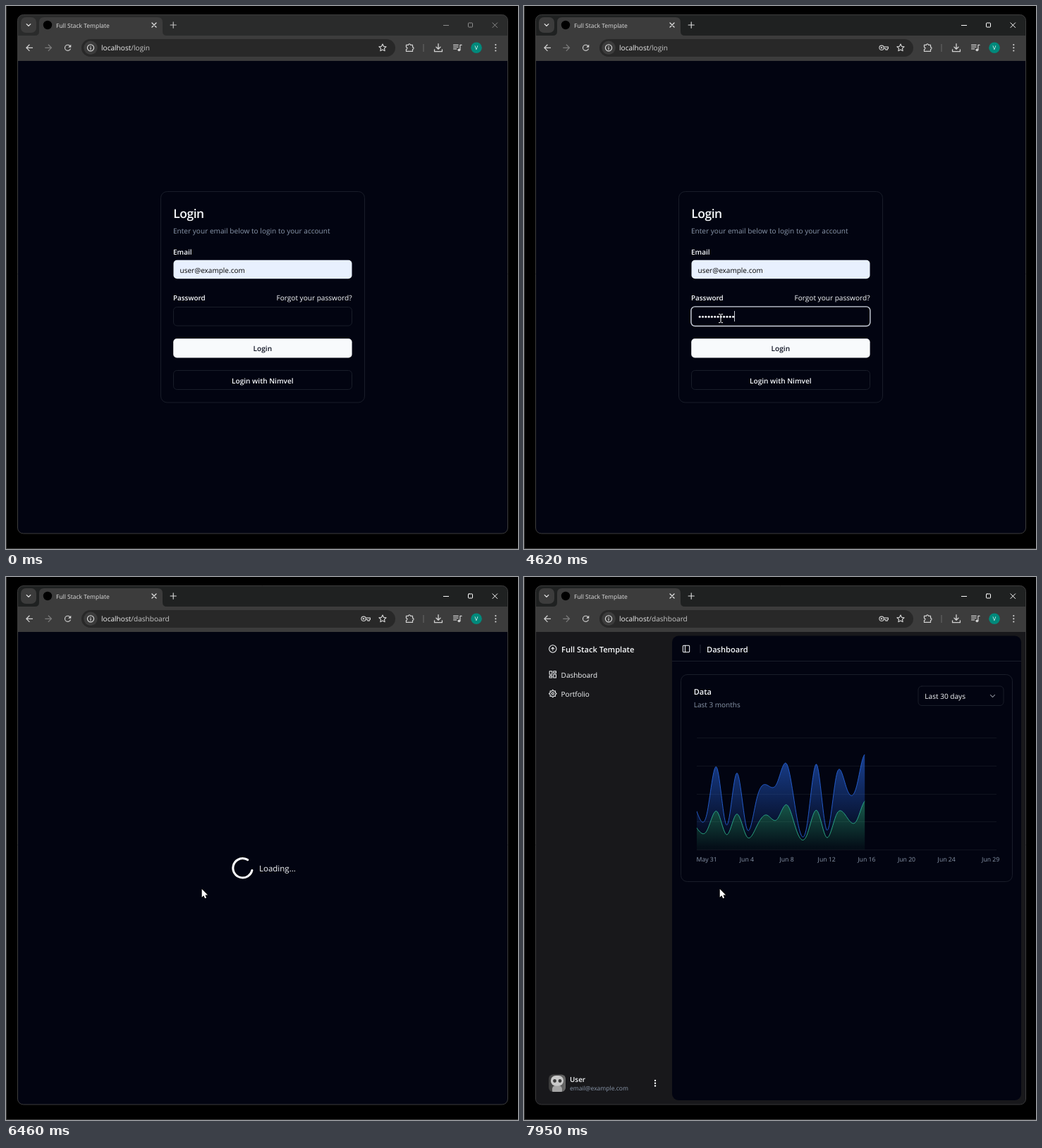
An HTML page with a canvas that plays this animation: 726x771 px, repeating every 8000 ms.

```html
<!DOCTYPE html>
<html lang="en">
<head>
<meta charset="utf-8">
<title>Login flow</title>
<style>
html, body { margin: 0; width: 100%; height: 100%; overflow: hidden; background: #000; }
canvas { display: block; width: 726px; height: 771px; }
</style>
</head>
<body>
<canvas id="stage" width="726" height="771"></canvas>
<script>
const ctx = document.getElementById('stage').getContext('2d');
const LOOP = 8000, STEP = 68.25;
const PAGE = '#020411', LINE = '#191d29', MUTED = '#8b98ab', WHITE = '#f8fafc', BAR = '#3c3c3c', ICON = '#d0d0d0';
const T = { move: 390, focus: 1070, load: 5150, redirect: 6410, ready: 7470 };
const KEYS = [2080, 2140, 2280, 2420, 2690, 2820, 3020, 3220, 4020, 4220, 4420, 4620];
const MOBILE = [230, 200, 410, 160, 380, 140, 250, 370, 320, 480, 200, 150, 420, 130, 380, 350, 310, 520, 170, 290, 450];
const DESKTOP = [178, 178, 470, 103, 439, 88, 294, 323, 385, 438, 155, 92, 492, 81, 426, 307, 371, 475, 107, 341, 408];
const CHART = { x: 245, w: 425, base: 387, gap: 425 / 30, scale: 0.1325 };

// ---------- drawing helpers ----------
function text(s, x, y, size, color = WHITE, weight = 400, align = 'left', spacing = 0) {
  ctx.font = `${weight} ${size}px "Open Sans", "Noto Sans", sans-serif`;
  ctx.textAlign = align;
  ctx.letterSpacing = spacing + 'px';
  ctx.fillStyle = color;
  ctx.fillText(s, x, y);
}
function rect(x, y, w, h, color) {
  ctx.fillStyle = color;
  ctx.fillRect(x, y, w, h);
}
function box(x, y, w, h, r, fill, stroke, lw = 1) {
  ctx.beginPath();
  ctx.roundRect(x, y, w, h, r);
  if (fill) { ctx.fillStyle = fill; ctx.fill(); }
  if (stroke) { ctx.strokeStyle = stroke; ctx.lineWidth = lw; ctx.stroke(); }
}
function disc(x, y, r, color) {
  ctx.beginPath();
  ctx.arc(x, y, r, 0, 7);
  ctx.fillStyle = color;
  ctx.fill();
}
// Path on a 24-unit grid, centred at cx, cy; lw 0 fills it.
function icon(d, cx, cy, size, color, lw = 2) {
  const p = new Path2D(d), k = size / 24;
  ctx.save();
  ctx.translate(cx, cy);
  ctx.scale(k, k);
  ctx.translate(-12, -12);
  ctx.lineCap = ctx.lineJoin = 'round';
  ctx.lineWidth = lw;
  ctx.fillStyle = ctx.strokeStyle = color;
  if (lw) ctx.stroke(p); else ctx.fill(p);
  ctx.restore();
}
const ring = (x, y, r) => `M${x - r} ${y}a${r} ${r} 0 1 0 ${2 * r} 0a${r} ${r} 0 1 0 ${-2 * r} 0`;
const CHEVRON = 'M6 9l6 6 6-6';
const CROSS = 'M6 6l12 12M18 6L6 18';

// ---------- browser ----------
function browser(t) {
  const active = t >= T.focus, ctl = active ? '#ffffff' : '#8c8c8c';
  box(16.5, 12.5, 695, 736.5, 8, PAGE);
  box(16.5, 12.5, 695, 40, [8, 8, 0, 0], active ? '#1f2121' : '#2a2b2b');
  rect(17, 42, 694, 36, BAR);

  box(21, 16, 22, 22, 7, BAR);
  icon(CHEVRON, 32, 27, 11, '#e3e3e3', 3);
  ctx.beginPath();
  ctx.moveTo(41, 42);
  ctx.quadraticCurveTo(47, 42, 47, 36);
  ctx.lineTo(47, 23);
  ctx.quadraticCurveTo(47, 16, 54, 16);
  ctx.lineTo(215, 16);
  ctx.quadraticCurveTo(222, 16, 222, 23);
  ctx.lineTo(222, 36);
  ctx.quadraticCurveTo(222, 42, 228, 42);
  ctx.fillStyle = BAR;
  ctx.fill();
  disc(59, 27, 6.2, '#000');
  text('Full Stack Template', 71, 30.6, 8.5, '#dedede');
  icon(CROSS, 210, 27, 12, '#e3e3e3', 2.6);
  icon('M12 3v18M3 12h18', 237.2, 27, 11, active ? '#dedede' : '#c4c4c4', 2.4);
  rect(620, 27, 8, 1, ctl);
  box(655.5, 24, 6, 6, 0.8, null, ctl);
  icon('M3 3l18 18M21 3L3 21', 693.3, 27.2, 9, ctl, 2.6);

  icon('M20 11H7.8l5.6-5.6L12 4l-8 8 8 8 1.4-1.4L7.8 13H20z', 33, 59.3, 15, ICON, 0);
  icon('M4 11h12.2l-5.6-5.6L12 4l8 8-8 8-1.4-1.4 5.6-5.6H4z', 60.3, 59.3, 15, '#7c7c7c', 0);
  icon('M17.65 6.35A8 8 0 1 0 19.73 14h-2.08A6 6 0 1 1 12 6c1.66 0 3.14.69 4.22 1.78L13 11h7V4z', 87.6, 59.3, 14, ICON, 0);
  box(107, 47, 445, 25, 12.5, '#282828');
  disc(120, 59.3, 9.7, BAR);
  icon(ring(12, 12, 8.5) + 'M12 11v5.5M12 7.8v.2', 120, 59.3, 13, '#e3e3e3', 2);
  text('localhost', 135, 62.8, 10.1, '#f1f1f1');
  const hostW = ctx.measureText('localhost').width;
  text(t < T.redirect ? '/login' : '/dashboard', 135 + hostW, 62.8, 10.1, '#c8c8c8');
  if (t >= KEYS[0]) {
    icon(ring(7, 12, 5.5) + 'M12.2 10H23v4h-2v3h-4v-3h-4.8', 510, 59.3, 14, ICON, 2);
    disc(507, 59.3, 1.2, ICON);
  }
  icon('M12 3.5l2.6 5.6 6.1.7-4.5 4.2 1.2 6L12 17l-5.4 3 1.2-6-4.5-4.2 6.1-.7z', 534, 59, 14, ICON, 2);
  icon('M4 6h5a2.5 2.5 0 1 1 5 0h5v5a2.5 2.5 0 1 1 0 5v5H4v-5a2.5 2.5 0 1 0 0-5z', 572.3, 59, 14.5, ICON, 2);
  rect(591.5, 54, 1, 11, '#686868');
  icon('M12 3v12M7 10.5l5 5 5-5M3 16.5V21h18v-4.5', 613, 59.2, 14.5, ICON, 2.2);
  icon('M3 6h11M3 10.5h11M3 15h7M18.5 17.5V6H22', 640, 59, 14.5, ICON, 2);
  disc(642.4, 62.3, 1.9, ICON);
  disc(667, 59.3, 7.8, '#00897b');
  text('V', 667, 62.2, 8, '#fff', 400, 'center');
  for (let i = -1; i < 2; i++) disc(694.3, 59.3 + i * 4.2, 1.1, ICON);
}

// ---------- login ----------
function pointer(t) {
  const s = Math.min(7, Math.floor((t - T.move) / 68.5)) / 7;
  const left = 236 * Math.pow(1 - s, 1.4);
  return { x: 278 + 0.8 * left, y: 443 + left };
}
function login(t) {
  const typed = KEYS.filter(k => t >= k).length;
  const m = pointer(t);
  const over = (y, h) => t >= T.move && m.y > y && m.y < y + h;

  box(219.5, 263.5, 289, 299.5, 9, null, LINE);
  text('Login', 237.3, 301, 17.4, WHITE, 600, 'left', -0.44);
  text('Enter your email below to login to your account', 237, 322.6, 10.1, MUTED);
  text('Email', 237, 353.2, 10, WHITE, 600);
  box(237.5, 360.8, 253, 26.4, 5, '#e8f0fe');
  text('user@example.com', 246.6, 378.5, 10, '#000');
  text('Password', 237, 417.6, 9.9, WHITE, 600);
  text('Forgot your password?', 490.5, 417.6, 10.1, WHITE, 400, 'right');

  box(237.5, 427.5, 253, 26.5, 5, null, LINE);
  if (t >= T.focus) {
    ctx.globalAlpha = t < 1140 ? 0.5 : 1;
    box(236.9, 426.9, 254, 27.6, 5.5, null, '#c9ced8', 1.4);
    ctx.globalAlpha = 1;
  }
  for (let i = 0; i < typed; i++) disc(249.2 + i * 4.3, 441.3, 1.5, WHITE);
  const blink = (t >= 1610 && t < KEYS[0]) || (t >= 3750 && t < KEYS[8]);
  if (t >= T.focus && !blink) rect(Math.floor(247 + typed * 4.3), 433, 1, 15, '#c8cbd2');

  box(237.2, 472.2, 253.4, 27.2, 5, over(472, 27) ? '#e0e2e5' : WHITE);
  text('Login', 363.8, 490.4, 10.1, '#0b1020', 600, 'center');
  box(237.5, 517.5, 253, 27, 5, over(517, 28) ? '#1e293b' : null, LINE);
  text('Login with Nimvel', 363.8, 535.6, 10.1, WHITE, 600, 'center');
}

// ---------- loading ----------
function spinner(cx, cy, ms) {
  const a = ms / 1000 * 2 * Math.PI;
  ctx.beginPath();
  ctx.arc(cx, cy, 13.7, a, a + 1.6 * Math.PI);
  ctx.strokeStyle = '#fff';
  ctx.lineWidth = 3.05;
  ctx.lineCap = 'round';
  ctx.stroke();
  text('Loading...', cx + 23.4, cy + 4.8, 11.5);
}
function triangle(x, y, h) {
  ctx.beginPath();
  ctx.moveTo(x - 4, y + h / 2);
  ctx.lineTo(x + 4, y + h / 2);
  ctx.lineTo(x, y - h / 2);
  ctx.fillStyle = '#9f9f9f';
  ctx.fill();
}
function scrollbar() {
  box(699, 78, 12, 670.5, [0, 0, 7, 0], '#2b2b2b');
  triangle(705, 83.7, 5);
  triangle(705, 743.3, -5);
  box(701.8, 91, 6.6, 591, 3.3, '#9f9f9f');
}

// ---------- dashboard ----------
// Second derivatives of a natural cubic spline on a unit grid.
function curvature(v) {
  const n = v.length, c = Array(n).fill(0), d = Array(n).fill(0), m = Array(n).fill(0);
  for (let i = 1; i < n - 1; i++) {
    const q = 4 - c[i - 1];
    c[i] = 1 / q;
    d[i] = (6 * (v[i - 1] - 2 * v[i] + v[i + 1]) - d[i - 1]) / q;
  }
  for (let i = n - 2; i > 0; i--) m[i] = d[i] - c[i] * m[i + 1];
  return m;
}
function curve(v) {
  const m = curvature(v), pts = [];
  for (let i = 0; i < v.length - 1; i++) for (let j = 0; j < 16; j++) {
    const u = j / 16, w = 1 - u;
    const y = w * v[i] + u * v[i + 1] + ((w ** 3 - w) * m[i] + (u ** 3 - u) * m[i + 1]) / 6;
    pts.push([CHART.x + (i + u) * CHART.gap, CHART.base - y * CHART.scale]);
  }
  return pts;
}
const lower = curve(MOBILE);
const upper = curve(MOBILE.map((v, i) => v + DESKTOP[i]));
const floor = lower.map(p => [p[0], CHART.base]);

function trace(pts) {
  ctx.beginPath();
  pts.forEach(p => ctx.lineTo(p[0], p[1]));
}
function area(top, bottom, y0, y1, rgb, alpha) {
  const g = ctx.createLinearGradient(0, y0, 0, y1);
  g.addColorStop(0.05, `rgba(${rgb},${alpha})`);
  g.addColorStop(0.95, `rgba(${rgb},0.06)`);
  trace(top.concat([...bottom].reverse()));
  ctx.fillStyle = g;
  ctx.fill();
  trace(top);
  ctx.strokeStyle = `rgb(${rgb})`;
  ctx.lineWidth = 0.9;
  ctx.stroke();
}
// cubic-bezier(.25,.1,.25,1)
function ease(x) {
  let lo = 0, hi = 1;
  for (let i = 0; i < 24; i++) {
    const s = (lo + hi) / 2, w = 1 - s;
    if (0.75 * w * w * s + 0.75 * w * s * s + s ** 3 < x) lo = s; else hi = s;
  }
  return 0.3 * (1 - lo) ** 2 * lo + 3 * (1 - lo) * lo * lo + lo ** 3;
}
function chart(ms) {
  for (let i = 0; i < 5; i++) rect(CHART.x, 228 + Math.round(i * 39.75), CHART.w, 1, '#10141f');
  ctx.save();
  ctx.beginPath();
  ctx.rect(CHART.x - 0.5, 200, 1 + CHART.w * ease(Math.min(1, ms / 1500)), 190);
  ctx.clip();
  area(lower, floor, 316, CHART.base, '46,184,138', 0.48);
  area(upper, lower, 253, 374, '38,98,217', 0.6);
  ctx.restore();
  ['May 31', 'Jun 4', 'Jun 8', 'Jun 12', 'Jun 16', 'Jun 20', 'Jun 24'].forEach((s, i) =>
    text(s, CHART.x + (1 + 4 * i) * CHART.gap, 404.2, 8.7, MUTED, 400, 'center'));
  text('Jun 29', 674.3, 404.2, 8.7, MUTED, 400, 'right');
}
function avatar() {
  ctx.save();
  ctx.beginPath();
  ctx.roundRect(35, 706.5, 24, 24.5, 6);
  ctx.clip();
  const g = ctx.createLinearGradient(35, 0, 59, 0);
  g.addColorStop(0, '#3a3a3a');
  g.addColorStop(1, '#6b6b6b');
  rect(35, 706, 24, 25, g);
  box(40, 722, 14, 12, 5, '#a5a5a5');
  box(38, 708, 18, 14.5, 7, '#c9c9c9');
  disc(43.5, 715.5, 2.4, '#3b3b3b');
  disc(51, 715.5, 2.4, '#3b3b3b');
  ctx.restore();
}
function dashboard(ms) {
  box(17, 78, 694, 670.5, [0, 0, 7.5, 7.5], '#18181b');
  icon(ring(12, 12, 10) + 'M16 12l-4-4-4 4M12 16V8', 40.8, 102, 12.4, WHITE);
  text('Full Stack Template', 53, 106.6, 11.1, WHITE, 600);
  icon('M3 3h7v9H3zM14 3h7v5h-7zM14 12h7v9h-7zM3 16h7v5H3z', 40.8, 138.3, 12.4, WHITE);
  text('Dashboard', 52.6, 142.6, 10, WHITE);
  let gear = '';
  for (let i = 0; i <= 48; i++) {
    const a = i / 48 * 2 * Math.PI, r = 8.6 + 1.5 * Math.cos(8 * a);
    gear += (i ? 'L' : 'M') + (12 + r * Math.sin(a)) + ' ' + (12 - r * Math.cos(a));
  }
  icon(gear + ring(12, 12, 3), 40.8, 165.6, 12.4, WHITE);
  text('Portfolio', 52.6, 169.8, 10, WHITE);
  avatar();
  text('User', 65, 717.2, 9.9, WHITE, 600);
  text('email@example.com', 65, 728.8, 8.55, MUTED);
  for (let i = -1; i < 2; i++) disc(186, 718.7 + i * 3.8, 1.2, WHITE);

  box(210, 83.5, 495, 659.5, 9, PAGE);
  icon('M5 3h14a2 2 0 0 1 2 2v14a2 2 0 0 1-2 2H5a2 2 0 0 1-2-2V5a2 2 0 0 1 2-2zM9 3v18', 230, 102, 12.4, WHITE);
  rect(249.5, 96, 1, 12, '#252936');
  text('Dashboard', 259, 106.6, 11.1, WHITE, 600);
  rect(210, 119, 495, 1, LINE);
  box(222.5, 138.5, 470, 294, 9, null, LINE);
  text('Data', 240.8, 167.4, 11, WHITE, 600);
  text('Last 3 months', 240.8, 185.4, 10, MUTED);
  box(559, 155, 121, 27.5, 5, null, LINE);
  text('Last 30 days', 568.3, 173, 10.1);
  icon(CHEVRON, 664.5, 169, 12.4, '#8a8f9a');
  chart(ms);
}

// ---------- pointer ----------
function drawPointer(t) {
  if (t < T.move) return;
  const p = pointer(t);
  if (t < T.load && p.y < 454) {
    rect(278.4, 438, 1.2, 11, '#e6e6e6');
    rect(276, 437, 2.4, 1.1, '#e6e6e6');
    rect(279.6, 437, 2.4, 1.1, '#e6e6e6');
    rect(276, 449, 2.4, 1.1, '#e6e6e6');
    rect(279.6, 449, 2.4, 1.1, '#e6e6e6');
    return;
  }
  const arrow = new Path2D('M0 0V11.8L2.7 9.3 4.4 13.3 6.4 12.4 4.7 8.5H8.3Z');
  ctx.save();
  ctx.translate(p.x - 0.3, p.y);
  ctx.lineWidth = 1.2;
  ctx.lineJoin = 'round';
  ctx.strokeStyle = '#000';
  ctx.stroke(arrow);
  ctx.fillStyle = '#fff';
  ctx.fill(arrow);
  ctx.restore();
}

function draw(t) {
  ctx.textRendering = 'geometricPrecision';
  rect(0, 0, 726, 771, '#000');
  rect(0, 0, 1, 771, '#3a3a3a');
  rect(0, 770, 726, 1, '#3a3a3a');
  browser(t);
  // The page advances in small steps, as in a screen recording.
  const q = T.load + Math.floor((t - T.load) / STEP) * STEP;
  if (t < T.load) login(t);
  else if (t < T.redirect) {
    scrollbar();
    spinner(330, 443.6, q - T.load);
  } else if (t < T.ready) spinner(335.6, 413.3, q - T.redirect);
  else dashboard(Math.max(5, q - T.ready + 8));
  box(16.5, 12.5, 695, 736.5, 8, null, '#3d3d3d');
  drawPointer(t);
}

const begin = performance.now();
function tick() {
  draw((performance.now() - begin) % LOOP);
  requestAnimationFrame(tick);
}
tick();
</script>
</body>
</html>
```
